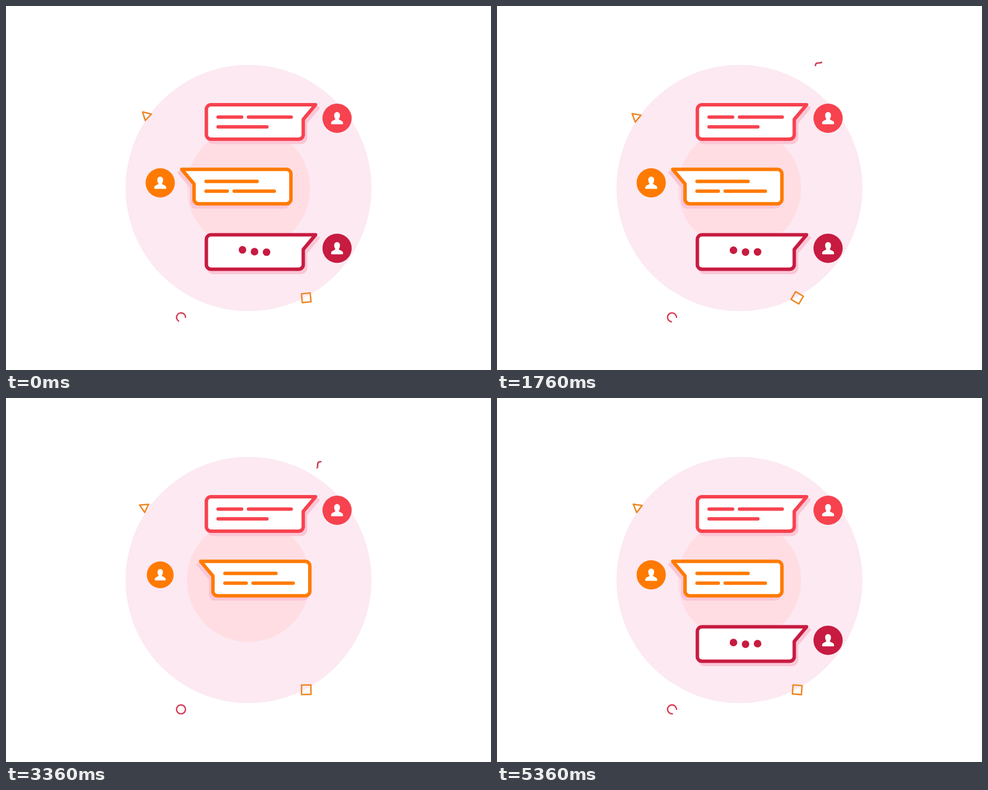
Recreate the animation shown at these times as an HTML page with a canvas. Size 846x634 px, loop 5440 ms.

```html
<!DOCTYPE html>
<html lang="en">
<head>
<meta charset="utf-8">
<title>Chat bubbles</title>
<style>
  html, body { margin: 0; width: 100%; height: 100%; overflow: hidden; background: #fff; }
  canvas { display: block; }
</style>
</head>
<body>
<canvas id="stage" width="846" height="634"></canvas>
<script>
const ctx = document.getElementById('stage').getContext('2d');
const LOOP = 5440, TAU = Math.PI * 2, RAD = Math.PI / 180;
const CLEAR = 2300;                    // the chat is empty from here until the next entry
const ORANGE = '#ff7a00', ACCENT = '#ee8522', ROSE = '#d93853';

const person = new Path2D('M-5-4.5C-6-13 6-13 5-4.5C5-1 3.5 0 3 1.5C4 4 10.5 3.5 10.5 9' +
  'Q10.5 10.5 9 10.5H-9Q-10.5 10.5-10.5 9C-10.5 3.5-4 4-3 1.5C-3.5 0-5-1-5-4.5Z');

const messages = [
  { y: 0, start: 2610, color: '#f7424f',
    lines: [[370, 411, 193.5], [423, 497.5, 193.5], [370, 455, 210.5]] },
  { y: 112.5, start: 2995, color: ORANGE, mirrored: true,
    lines: [[408.5, 497.5, 193], [460.5, 497.5, 210], [378.5, 448.5, 210]] },
  { y: 226.5, start: 3380, color: '#c71b41', typing: true }
];

const unit = (t, a, b) => Math.min(1, Math.max(0, (t - a) / (b - a)));
const smooth = (t, a, b) => { const p = unit(t, a, b); return p * p * (3 - 2 * p); };

function disc(x, y, r, color) {
  ctx.fillStyle = color;
  ctx.beginPath();
  ctx.arc(x, y, r, 0, TAU);
  ctx.fill();
}

function stroke(color, width) {
  ctx.strokeStyle = color;
  ctx.lineWidth = width;
  ctx.stroke();
}

function scaleAt(x, y, s) {
  ctx.translate(x, y);
  ctx.scale(s, s);
  ctx.translate(-x, -y);
}

function bubblePath(dx, dy) {
  ctx.beginPath();
  ctx.moveTo(400 + dx, 172 + dy);
  ctx.lineTo(540 + dx, 172 + dy);
  ctx.lineTo(518.5 + dx, 197.5 + dy);
  ctx.arcTo(518.5 + dx, 232 + dy, 400 + dx, 232 + dy, 8);
  ctx.arcTo(349.5 + dx, 232 + dy, 349.5 + dx, 200 + dy, 8);
  ctx.arcTo(349.5 + dx, 172 + dy, 400 + dx, 172 + dy, 8);
  ctx.closePath();
}

function typingDots(t, color) {
  const now = t < CLEAR ? t + LOOP : t;
  ctx.save();
  ctx.globalAlpha *= smooth(now, 4040, 4320);
  for (let i = 0; i < 3; i++) {
    const phase = Math.max(-540, (now - 5360) * 0.398 - 77 - i * 80);
    disc(412.5 + i * 21, 200 - 2.5 * Math.cos(phase * RAD), 6.6, color);
  }
  ctx.restore();
}

function drawMessage(m, t) {
  const leaving = t < CLEAR;
  const age = t - m.start;
  if (!leaving && age < 0) return;

  const p = unit(t, 1800, 2250);
  const exit = leaving ? 1 - (2.7 * p ** 3 - 1.7 * p * p) : 1;
  if (exit <= 0.001) return;
  const slide = leaving ? 0 : 120 - 153 * smooth(age, 0, 370) + 33 * smooth(age, 370, 500);
  const pop = leaving ? exit : 1.15 * smooth(age, 110, 470) - 0.15 * smooth(age, 470, 540);

  ctx.save();
  if (m.mirrored) {
    ctx.translate(846.5, 0);
    ctx.scale(-1, 1);
  }
  ctx.translate(0, m.y);

  ctx.save();
  ctx.globalAlpha = leaving ? 1 : unit(age, 0, 80);
  ctx.translate(slide, 0);
  scaleAt(445, 202, exit);
  bubblePath(4, 5.5);
  ctx.fillStyle = '#fac6d5';
  ctx.fill();
  stroke('#fac6d5', 6);
  bubblePath(0, 0);
  ctx.fillStyle = '#fff';
  ctx.fill();
  stroke(m.color, 6);
  for (const [x1, x2, y] of m.lines || []) {
    ctx.beginPath();
    ctx.moveTo(x1, y);
    ctx.lineTo(x2, y);
    stroke(m.color, 6);
  }
  if (m.typing) typingDots(t, m.color);
  ctx.restore();

  ctx.translate(577.5, 195.5);
  ctx.scale(pop, pop);
  disc(0, 0, 25.5, m.color);
  ctx.fillStyle = '#fff';
  ctx.fill(person);
  ctx.restore();
}

function triangle(t) {
  ctx.save();
  ctx.translate(243, 191.3);
  ctx.rotate((-17 + 360 * t / LOOP) * RAD);
  ctx.beginPath();
  for (let i = 0; i < 3; i++) {
    ctx.lineTo(2 + 9 * Math.cos(i * TAU / 3), 9 * Math.sin(i * TAU / 3));
  }
  ctx.closePath();
  stroke(ACCENT, 2.5);
  ctx.restore();
}

function square(t, beat) {
  const side = 14.5 - 2 * Math.cos(beat * TAU);
  ctx.save();
  ctx.translate(523.7, 508.2);
  ctx.rotate((-6 - 720 * t / LOOP) * RAD);
  ctx.beginPath();
  ctx.rect(-side / 2, -side / 2, side, side);
  stroke(ACCENT, 2.5);
  ctx.restore();
}

function ring(beat) {
  const ms = beat * LOOP / 3;
  const head = smooth(ms, 0, 640), tail = unit(ms, 970, 1740);
  if (tail >= 1) return;
  ctx.beginPath();
  ctx.arc(305.3, 542.3, 7.8, tail * TAU, head * TAU);
  stroke(ROSE, 2.4);
}

function squiggle(t) {
  const head = unit(t, 500, 3360) ** 1.3, tail = smooth(t, 2300, 4100);
  if (head <= tail) return;
  ctx.beginPath();
  for (let i = 0; i <= 40; i++) {
    const s = tail + (head - tail) * i / 40;
    const along = -468 + 47 * s, across = 660.5 + 3.5 * Math.cos(2 * TAU * s);
    ctx.lineTo((across - along) / 2, (across + along) / 2);
  }
  stroke('#c93a55', 2.6);
}

function draw(t) {
  const beat = (t - 2395 + LOOP) / (LOOP / 3) % 1;
  ctx.clearRect(0, 0, 846, 634);
  ctx.lineCap = ctx.lineJoin = 'round';
  disc(423, 317, 214.5, '#fce9f2');
  disc(423, 317.5, 107.3, '#ffdde3');
  triangle(t);
  square(t, beat);
  ring(beat);
  squiggle(t);
  for (const m of messages) drawMessage(m, t);
}

const begin = performance.now();
function tick() {
  draw((performance.now() - begin) % LOOP);
  requestAnimationFrame(tick);
}
tick();
</script>
</body>
</html>
```
